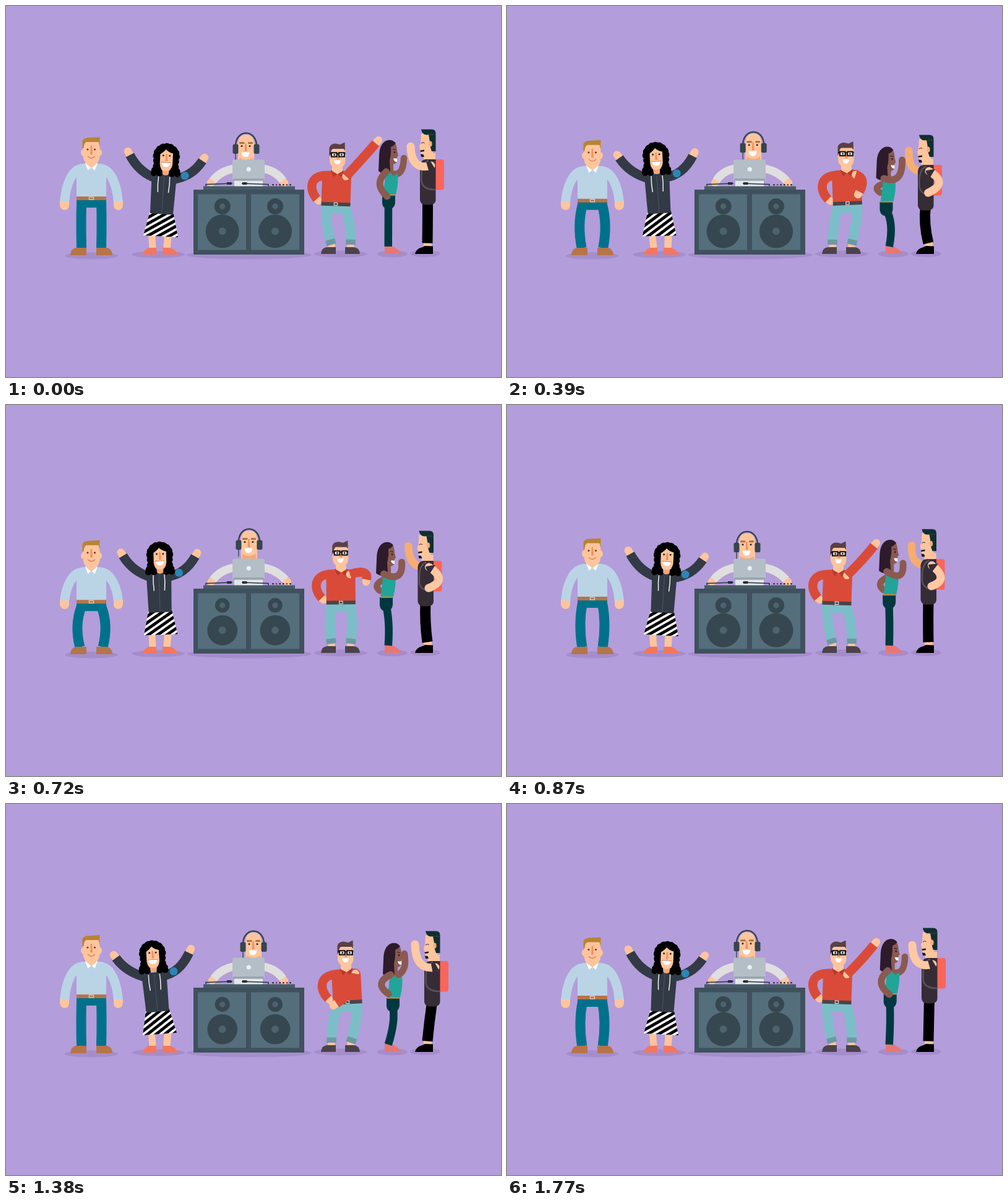
Write an HTML page with a canvas that moves like this. It is 800x600 px and loops after 1800 ms.

```html
<!DOCTYPE html>
<html lang="en">
<head>
<meta charset="utf-8">
<title>Dance party</title>
<style>
html, body { margin: 0; width: 100%; height: 100%; overflow: hidden; background: #b39ddb; }
canvas { display: block; width: 800px; height: 600px; }
</style>
</head>
<body>
<canvas id="stage" width="800" height="600"></canvas>
<script>
const LOOP = 1800, STEP = 30;
const g = document.getElementById('stage').getContext('2d');
const SKIN = '#fec59d', NOSE = '#f4915a', DARK = '#323a45', INK = '#2b2528';

// ---- timing -------------------------------------------------------------
// Smooth periodic curve through [time, value] keys, without overshoot.
function curve(period, times, vals) {
  const n = times.length;
  const gap = times.map((t, i) => (times[(i + 1) % n] - t + period) % period);
  const slope = vals.map((v, i) => (vals[(i + 1) % n] - v) / gap[i]);
  const tan = slope.map((s, i) => {
    const j = (i + n - 1) % n, p = slope[j];
    if (p * s <= 0) return 0;
    const a = 2 * gap[i] + gap[j], b = gap[i] + 2 * gap[j];
    return (a + b) / (a / p + b / s);
  });
  return time => {
    const t = time % period;
    let i = n - 1;
    while (times[i] > t) i--;
    const j = (i + 1) % n, h = gap[i], u = (t - times[i]) / h;
    const a = u * u * (3 - 2 * u);
    return vals[i] * (1 - a) + vals[j] * a
      + h * u * (1 - u) * (tan[i] * (1 - u) - tan[j] * u);
  };
}
const beat = (...v) => curve(450, [0, 30, 120, 180, 240, 290, 420], v);
const sway = (...v) => curve(900, [0, 180, 240, 480, 570, 870], v);
const swing = (...v) => curve(900, [0, 180, 240, 345, 480, 570, 720, 870], v);
const turn = (...v) => curve(1800, [0, 240, 570, 870, 1080, 1380, 1770], v);
const pair = (x, y) => t => [x(t), y(t)];

// ---- drawing helpers ----------------------------------------------------
function fill(color, d) { g.fillStyle = color; g.fill(new Path2D(d)); }
function line(color, width, d, cap = 'butt') {
  g.strokeStyle = color; g.lineWidth = width; g.lineCap = cap;
  g.stroke(new Path2D(d));
}
function oval(color, x, y, rx, ry = rx) {
  g.fillStyle = color; g.beginPath(); g.ellipse(x, y, rx, ry, 0, 0, 7); g.fill();
}
function box(color, x, y, w, h, r = 0) {
  g.fillStyle = color; g.beginPath(); g.roundRect(x, y, w, h, r); g.fill();
}
function place(x, y, deg, draw) {
  g.save(); g.translate(x, y); g.rotate(deg * Math.PI / 180); draw(); g.restore();
}
function sides(x, draw) {
  for (const s of [-1, 1]) { g.save(); g.translate(x, 0); g.scale(s, 1); draw(s); g.restore(); }
}
const mix = (a, b, k) => [a[0] + (b[0] - a[0]) * k, a[1] + (b[1] - a[1]) * k];
const add = (a, x, y) => [a[0] + x, a[1] + y];
function spin(o, deg, x, y) {
  const r = deg * Math.PI / 180, c = Math.cos(r), s = Math.sin(r);
  return [o[0] + x * c - y * s, o[1] + x * s + y * c];
}
function limb(color, w, a, b, c, cap) { line(color, w, `M${a}Q${b} ${c}`, cap); }
function sleeve(color, w, a, b, c) {
  limb(SKIN, 12.5, a, b, c, 'round');
  limb(color, w, a, b, mix(c, b, .17));
}
function smile(x, y, w, h) {
  fill('#fff', `M${x - w},${y}H${x + w}Q${x + w - 1},${y + h} ${x},${y + h}Q${x - w + 1},${y + h} ${x - w},${y}Z`);
}
function nose(x, y, h) { fill(NOSE, `M${x - 1.3},${y}H${x + 1}L${x + 2},${y + h}H${x - 1.8}Z`); }

// ---- man in the blue shirt ----------------------------------------------
const bounce = beat(0, 0, 1, 3.3, 7, 7.4, 2);
const nod = beat(0, 0, -1, 1.6, 6, 7, 3.5);
function blueShirt(t) {
  const d = bounce(t), bow = 4 * Math.sqrt(d), teal = '#00718b', shirt = '#bad4e6', brown = '#b67449';
  sides(138, () => {
    line(teal, 16, `M16,${318 + d}Q${17 + bow},${352 + d / 2} ${16 + d * .35},391.5`);
    fill(brown, 'M8,391H23Q33,391 34,403H8Z');
    fill(SKIN, 'M36,315H51V322Q50,330 43,330Q36,329 36,322Z');
    line(shirt, 15, `M15,${263 + d}C31,${264 + d} 41,${288 + d * .8} 43.3,316`);
  });
  g.save();
  g.translate(138, d);
  fill(teal, 'M-24,313H24V326H-24Z');
  fill(shirt, 'M-15,255H15Q23,256 24,268V309H-24V268Q-23,256 -15,255Z');
  box(brown, -24, 308, 48, 6);
  g.strokeStyle = '#dccfc2'; g.lineWidth = 1.3;
  g.strokeRect(-3.5, 309, 7, 4);
  fill('#fff', 'M-10,254L-5.5,266L0,261L5.5,266L10,254Z');
  fill(SKIN, 'M-8,250H8V256L0,262L-8,256Z');
  g.restore();
  g.save();
  g.translate(138, nod(t));
  oval(SKIN, -13, 237, 4, 5.5);
  oval(SKIN, 13, 237, 4, 5.5);
  fill(SKIN, 'M-13.5,217H13.5V243Q12,257 0,257Q-12,257 -13.5,243Z');
  fill('#b88430', 'M-14.5,230V218Q-12,213 -4,213L13.5,212V228L11.5,220H-8Q-12,221 -12.5,230Z');
  oval('#7a3b22', -6, 232, 1.6);
  oval('#7a3b22', 5.5, 232, 1.6);
  nose(0, 226, 14);
  line('#e37b52', 1.3, 'M-6,243Q0,249 6,243');
  g.restore();
}

// ---- woman in the hoodie ------------------------------------------------
const waist = pair(sway(251.5, 249.5, 249, 245, 247, 251), sway(335.5, 334, 333, 335, 334, 335));
const lean = sway(4, 3, 1, -5.5, -6, 3.5);
const curlyHead = pair(sway(259, 256, 253, 237, 238.5, 258.5), sway(248, 246, 245, 246.5, 246, 248));
const waveL = pair(sway(197, 193, 190, 174, 176, 196), sway(235, 233, 233, 244, 243, 235));
const waveR = pair(sway(321, 318, 316, 299, 300, 320), sway(245, 242, 241, 234, 233, 245));
const hemL = pair(sway(222, 218, 217, 221, 225, 221), sway(371, 369.5, 369, 374, 374, 371));
const hemR = pair(sway(278, 272, 271, 276, 278, 277), sway(374, 374, 373, 370, 367, 374));
function hoodie(t) {
  const w = waist(t), a = lean(t), head = curlyHead(t), coral = '#f4775c';
  const hl = hemL(t), hr = hemR(t);
  line(SKIN, 11, `M${(hl[0] + 236 * 2) / 3 + 4},366L237,391`);
  line(SKIN, 11.5, `M${(hr[0] + 262 * 2) / 3 - 5},366L260,391`);
  fill(coral, 'M220,402Q223,394 231,391H243V402Z');
  fill(coral, 'M279,402Q274,394 265,391H253V402Z');
  g.save();
  g.clip(new Path2D(`M${spin(w, a, -19, -2)}L${spin(w, a, 19, -2)}L${hr}L${hl}Z`));
  g.fillStyle = '#fff'; g.fillRect(190, 320, 110, 70);
  place(w[0], w[1] + 18, -33 + a, () => {
    for (let y = -49; y < 50; y += 8.6) box('#000', -60, y, 120, 4.9);
  });
  g.restore();

  const sl = spin(w, a, -12, -56), sr = spin(w, a, 13, -56), l = waveL(t), r = waveR(t);
  const cl = [l[0] + (sl[0] - l[0]) * .4, l[1] + (sl[1] - l[1]) * .8];
  const cr = [r[0] + (sr[0] - r[0]) * .4, r[1] + (sr[1] - r[1]) * .9];
  sleeve(DARK, 15, sl, cl, l);
  sleeve(DARK, 15, sr, cr, r);
  place(...w, a, () => {
    fill(DARK, 'M-12,-63H12Q19,-62 20,-54L18.5,1H-18.5L-20,-54Q-19,-62 -12,-63Z');
    line('#4d5661', 1, 'M0,-60V0');
    line('#eef0f2', 1.5, 'M-9,-60Q-10,-48 -8.5,-34');
    line('#eef0f2', 1.5, 'M9,-60Q10,-48 8.5,-34');
  });
  const patch = mix(mix(sr, cr, .35), mix(cr, r, .35), .35);
  oval('#2b86b5', ...patch, 6.5);

  place(...head, a * .7, () => {
    for (let i = 0; i < 9; i++) {
      const k = Math.PI * (1 + i / 8);
      oval('#000', Math.cos(k) * 15, -5 + Math.sin(k) * 14.5, 6.8);
    }
    for (const s of [-1, 1]) {
      oval('#000', s * 14.5, 3, 6.5);
      oval('#000', s * 14, 12, 7);
      oval('#000', s * 17, 19, 6.5);
      oval('#000', s * 10, 22, 6);
      oval('#000', s * 19, 23, 5);
    }
    box('#000', -13, -18, 26, 34, 4);
    fill('#f0a878', 'M-6,14H6L5,24Q0,28 -5,24Z');
    fill(SKIN, 'M-10,-8Q-4,-12 -1,-16Q4,-11 10.5,-10V8Q9,19 0,19Q-9,19 -10,8Z');
    oval(INK, -5, -6, 1.5);
    oval(INK, 5.5, -6, 1.5);
    nose(.3, -9, 12);
    line('#9b4634', 1, 'M-7.5,5.4H7.5');
    smile(0, 5.5, 7, 7);
  });
}

// ---- DJ -----------------------------------------------------------------
const djX = sway(388, 388.5, 391.5, 400, 399, 388);
const djY = beat(0, 0, -1.5, -3, -5, -5, -.7);
const djL = turn(331, 338, 333, 331, 331, 333, 331);
const djR = turn(450, 455, 455, 454, 450, 450, 450);
const woofer = beat(27, 24.3, 23.6, 23.8, 24.2, 24.6, 27.5);
const tweeter = beat(13, 12, 11.5, 11.5, 11.6, 12, 13);
function dj(t) {
  const gear = '#36454e';
  sleeve('#dfdfdf', 13, [378, 262], [350, 263], [djL(t), 286]);
  sleeve('#dfdfdf', 13, [406, 262], [434, 263], [djR(t), 286]);
  g.save();
  g.translate(djX(t), djY(t));
  line(gear, 1.4, 'M-17,238V250');
  fill(SKIN, 'M-13,255V222Q-12,208 0,208Q12,208 13,222V255Z');
  fill('#f3aa7b', 'M-11,245Q0,253 11,245V256H-11Z');
  line(gear, 2.4, 'M-17,228C-18,198 18,198 17,228');
  box(gear, -21.5, 223.5, 9, 15.5, 2.5);
  box(gear, 12.5, 223.5, 9, 15.5, 2.5);
  box('#a9753f', -11, 220, 8.5, 3, 1);
  box('#a9753f', 3, 220, 8, 3, 1);
  oval(INK, -7, 226.5, 1.5);
  oval(INK, 6, 226.5, 1.5);
  nose(-.5, 222, 13);
  smile(-1, 236.5, 6.5, 8);
  g.restore();

  box('#e3e7ea', 369, 280, 46, 13);
  box('#b4bec6', 366, 248.5, 52, 34, 3);
  box('#97a5ae', 367, 279, 50, 3.5, 1.5);
  oval('#eef1f4', 392.3, 264, 3.6);
  const arm = '#26323a';
  line(arm, 1.5, 'M323,291.500V288.500L366,287');
  line(arm, 1.5, 'M381,287L424,288.500V291.500');
  box(arm, 357, 285, 7.5, 4);
  box(arm, 382, 285, 7.5, 4);
  for (let i = 0; i < 6; i++) {
    const x = 431.5 + i * 5.6;
    box('#90a4ae', x - .5, 289, 1, 3);
    box(i % 3 == 1 ? '#a33248' : arm, x - 1.3, 288, 2.6, 2.2);
  }
  box('#475c67', 319, 291.5, 148, 6);
  box('#3e515c', 303, 297, 179, 105);
  for (const x of [310, 396]) {
    box('#546e7c', x, 304.5, 78, 90);
    const c = x == 310 ? 349.7 : 435;
    oval('#37474f', c, 364.3, woofer(t));
    oval('#4c626d', c, 364.3, 6);
    oval('#37474f', c, 324, tweeter(t));
    oval('#4c626d', c, 324, 4.7);
  }
}

// ---- man in the red shirt -----------------------------------------------
const hips = pair(sway(533, 536, 542.5, 552, 551, 533), sway(320, 315, 315, 320, 318, 320));
const tilt = sway(2, 1.2, 0, -3, -3, 2);
const redHead = pair(sway(536, 537.5, 543, 549, 547.3, 536), sway(0, -5, -5, 0, -2.3, 0));
const reach = pair(swing(602, 599, 600, 586, 529, 532, 582, 597), swing(217, 231, 238, 288, 326, 325, 286, 223));
const elbow = pair(swing(576, 575, 577, 588, 560, 558, 586, 574), swing(247, 251, 240, 262, 305, 305, 264, 252));
function redShirt(t) {
  const h = hips(t), a = tilt(t), head = redHead(t), red = '#d94b38', jean = '#7cbec8', grey = '#4b4349';
  const feet = [[526, 386], [557, 386]];
  feet.forEach((f, i) => {
    const s = i ? 1 : -1, top = spin(h, a, s * 15.5, 4);
    const bend = [mix(top, f, .5)[0] + s * (h[1] - 314) * .9, 352];
    line(SKIN, 11, `M${f[0]},382V391`);
    limb(jean, 16, top, bend, f);
    limb('#6e98a1', 15.5, mix(f, bend, .24), mix(f, bend, .12), f);
  });
  fill(grey, 'M533,390V401H509Q510,390 520,390Z');
  fill(grey, 'M548,390V401H572Q571,390 561,390Z');
  place(...h, a, () => {
    fill(jean, 'M-23.500,0H23.500V16H-23.500Z');
    limb(SKIN, 12, [-38, -16], [-34, -9], [-28, -4], 'round');
    line(red, 14.5, 'M-14,-45.500C-44,-46 -45,-22 -31,-7');
    fill(red, 'M-15,-53H15Q23,-52 23.500,-43V-2H-23.500V-43Q-23,-52 -15,-53Z');
    box(grey, -23.5, -2.5, 47, 6);
    g.strokeStyle = '#ddd3d0'; g.lineWidth = 1.2;
    g.strokeRect(-2.7, -1.7, 5.4, 4.2);
    fill('#b43a2d', 'M-10,-54L-5,-43L1,-49L7,-43L11,-54Z');
    fill(SKIN, 'M-8,-60H9V-53L1,-48L-8,-53Z');
  });
  sleeve(red, 15, spin(h, a, 15, -45), elbow(t), reach(t));
  g.save();
  g.translate(...head);
  fill(SKIN, 'M-13,230H12.500V250Q12,262 0,262.500Q-12,262 -13,250Z');
  fill('#5b3f45', 'M-13.500,243V229Q-11,222 -3,222.500L4,224L11.500,220.500L12,234L9.500,231H-8Q-11,233 -11.500,241Z');
  oval('#fff', -5.5, 240.5, 3.5);
  oval('#fff', 6.3, 240.5, 3.5);
  nose(.4, 240, 8);
  g.strokeStyle = '#17171a'; g.lineWidth = 2.2;
  g.strokeRect(-10, 237.3, 8.6, 6.4);
  g.strokeRect(2.2, 237.3, 8.6, 6.4);
  line('#17171a', 2, 'M-13,238.500H-10M-1.500,239H2.500M10.500,238.500H12.500');
  oval(INK, -5.3, 240.5, 1.5);
  oval(INK, 6.3, 240.5, 1.5);
  smile(-.3, 249.5, 5.5, 6.8);
  g.restore();
}

// ---- high-five pair -----------------------------------------------------
const herMove = pair(turn(0, -5.5, -5.5, -.8, 5.7, 7, .7), turn(0, 11.3, 9.6, 1.3, 7, 8, 1.6));
const herNear = pair(turn(616, 638, 639, 640, 640, 618, 618), turn(308, 247, 253, 256, 299, 307, 308));
const herNearBend = pair(turn(593, 637, 641, 642, 604, 594, 593), turn(288, 291, 288, 288, 307, 290, 289));
const herFar = pair(turn(643, 603, 603, 608, 645, 644, 643), turn(246, 302, 301, 299, 250, 242, 247));
const herFarBend = pair(turn(642, 588, 589, 594, 650, 649, 643), turn(277, 292, 291, 286, 277, 272, 277));
function greenTop(t) {
  const m = herMove(t), skin = '#8a5a50', hair = '#2d1b2b', pants = '#00383f';
  const hip = add([618, 318], ...m);
  line(skin, 9, 'M617.500,384V392');
  fill('#e77774', 'M612,388.500H624Q634,393 640,401H612Z');
  limb(pants, 12.5, hip, [618 + m[1] * 1 + m[0] * .6, 350], [617.8, 389]);
  const farTop = mix(add([622, 273], ...m), herFar(t), .08);
  limb(skin, 10.5, farTop, herFarBend(t), herFar(t), 'round');
  g.save();
  g.translate(...m);
  fill(pants, 'M608,306H629V318Q628,327 621,328H614Q608,325 608,318Z');
  fill(skin, 'M615,254H626V272H615Z');
  fill('#20a598', 'M613,271L617,266L627,275L633,270Q635,284 630,305H609Q612,290 613,271Z');
  box('#c28a45', 609, 304.5, 19.5, 2.3);
  fill(skin, 'M614,222H629Q632,226 632,234L634,242L632,244V251Q630,257 621,256H614Z');
  fill(hair, 'M630,222Q624,214 614,218Q603,224 603,244L602,267Q612,275 621,267L620,250Q623,237 622,228Q627,226 630,222Z');
  line(INK, 1.2, 'M625,231.500L630,232.500');
  oval(INK, 628, 236.5, 1.5);
  fill('#fff', 'M632,246.500L626,246.500Q627,252 632,252Z');
  g.restore();
  limb(skin, 11, add([614.5, 268], ...m), herNearBend(t), herNear(t), 'round');
}

const hisMove = pair(turn(0, -5, -5, -.5, 5.7, 7, 1), turn(0, 9.5, 7.5, 1.3, 5, 6, 1));
const hisNear = pair(turn(654, 681, 680, 686, 660, 661, 655), turn(227, 304, 298, 293, 233, 227, 228));
const hisNearBend = pair(turn(655, 712, 716, 716, 661, 662, 656), turn(267, 288, 284, 282, 271, 270, 268));
const hisFar = pair(turn(680, 650, 649, 654, 684, 688, 682), turn(285, 240, 230, 227, 288, 290, 286));
const hisFarBend = pair(turn(682, 648, 650, 652, 686, 689, 683), turn(270, 271, 263, 257, 274, 276, 271));
function backpacker(t) {
  const m = hisMove(t), vest = '#352c36', hair = '#122e2e', skin = '#fec9a3';
  const near = hisNear(t), bend = hisNearBend(t), shoulder = add([687, 258], ...m);
  line(SKIN, 13, 'M681.500,381V390');
  fill('#000', 'M690,388.500V401H661Q662,393 673,390L677,388Z');
  limb('#000', 17, add([681.5, 315], ...m), [681.5 + m[0] * .8 - m[1] * .5, 352], [681, 383.5]);
  limb('#f6ad72', 12.5, add([676, 258], ...m), hisFarBend(t), hisFar(t), 'round');
  g.save();
  g.translate(...m);
  box('#fa655a', 688, 248, 20, 49.5, 4);
  fill(SKIN, 'M675,238H694V252H675Z');
  fill(vest, 'M678,248H694.500V314Q694,321 686,321.500H677Q669,320 669,313V258Q670,249 678,248Z');
  line('#5a525b', 2.4, 'M683,250Q672,254 671.500,272V283Q673,297 694,297');
  fill(SKIN, 'M671,206H690V243H676Q671,243 670,236L668,227L670,222Z');
  fill(hair, 'M671,199.500H688Q694.500,199.500 694.500,206V235H688L686,229L684.500,216L683,208H677Q672,206 671,199.500Z');
  line('#31524f', .8, 'M678,208H694');
  oval('#f4ad7c', 686, 223, 2.6, 4.5);
  line(INK, 1, 'M671,222Q673.500,219.500 676.500,221.500');
  fill('#17171a', 'M669.500,233.500L676,232.500V235L670,236Z');
  fill('#17171a', 'M670,239.500L674.500,240L676,244H671Z');
  g.restore();
  limb(skin, 13, shoulder, bend, near, 'round');
  limb(vest, 15, add(shoulder, 2, -2), mix(shoulder, bend, .08), mix(shoulder, bend, .18));
}

// ---- scene --------------------------------------------------------------
function draw(t) {
  g.fillStyle = '#b39ddb';
  g.fillRect(0, 0, 800, 600);
  const shade = '#a58dcc';
  oval(shade, 138, 404, 43, 5.5);
  oval(shade, 246, 402, 43, 5.5);
  oval(shade, 393, 402.5, 101, 7);
  oval(shade, 541, 401, 43, 5.5);
  oval(shade, 624.5, 401, 24.5, 5.5);
  oval(shade, 677.5, 400.5, 24.5, 5.5);
  blueShirt(t);
  hoodie(t);
  dj(t);
  redShirt(t);
  greenTop(t);
  backpacker(t);
}

const start = performance.now();
function tick() {
  const t = (performance.now() - start) % LOOP;
  draw(Math.floor(t / STEP) * STEP);
  requestAnimationFrame(tick);
}
tick();
</script>
</body>
</html>
```
